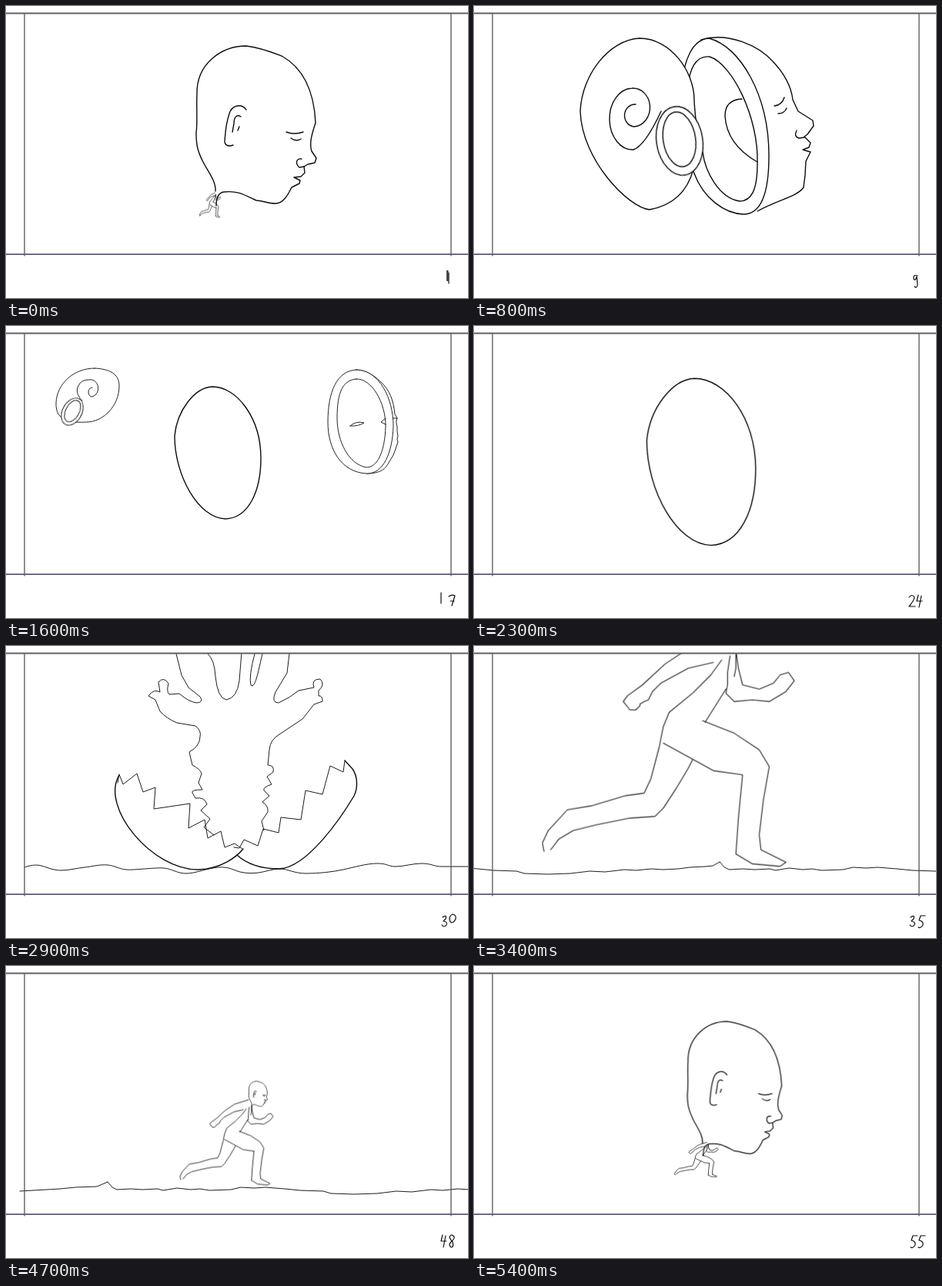
Recreate the animation shown at these times as an HTML page without scripts. Size 600 by 380 pixels, loop 5500 ms.

```html
<!DOCTYPE html>
<html lang="en">
<head>
<meta charset="utf-8">
<title>Line-drawn loop</title>
<style>
html, body { margin: 0; width: 100%; height: 100%; overflow: hidden; background: #fff; }
svg { display: block; }
.stage { width: 600px; height: 380px; fill: none; stroke: #0c0c0c; stroke-width: 1.2; stroke-linejoin: round; stroke-linecap: round; }
path, ellipse { vector-effect: non-scaling-stroke; }
.solid { fill: #fff; }
.thin { stroke-width: 1; stroke: #1c1c1c; }
.bold { stroke-width: 1.4; }

/* 55 drawings of 100 ms; steps() holds each one */
.stage * { animation-duration: 5.5s; animation-iteration-count: infinite; animation-timing-function: step-end; }

/* when each part is on stage */
.show-whole { animation-name: whole; }
@keyframes whole { 0% { opacity: 1 } 7.272% { opacity: 0 } 70.909%, 100% { opacity: 1 } }
.show-runner { animation-name: runnerOn; }
@keyframes runnerOn { 0% { opacity: 1 } 7.272% { opacity: 0 } 59.999%, 100% { opacity: 1 } }
.show-split { animation-name: split; }
@keyframes split { 0% { opacity: 0 } 7.272% { opacity: 1 } 41.818%, 100% { opacity: 0 } }
.show-marks { animation-name: marks; }
@keyframes marks { 0% { opacity: 1 } 16.363%, 100% { opacity: 0 } }
.show-slits { animation-name: slits; }
@keyframes slits { 0% { opacity: 0 } 25.454%, 100% { opacity: 1 } }
.show-egg { animation-name: eggOn; }
@keyframes eggOn { 0% { opacity: 0 } 16.363% { opacity: 1 } 45.454%, 100% { opacity: 0 } }
.show-hatch { animation-name: hatch; }
@keyframes hatch { 0% { opacity: 0 } 45.454% { opacity: 1 } 59.999%, 100% { opacity: 0 } }
.show-track { animation-name: trackOn; }
@keyframes trackOn { 0% { opacity: 0 } 59.999% { opacity: 1 } 92.727%, 100% { opacity: 0 } }
.show-past { animation-name: past; }
@keyframes past { 0% { opacity: 1 } 85.454%, 100% { opacity: 0 } }

/* whole head and running body */
.head { animation-name: head; }
@keyframes head {
  0% { transform: translate(0, 0) scale(1, 1); stroke-width: 1.4; animation-timing-function: steps(4) }
  7.272% { transform: translate(-25px, -14px) scale(1.08, 1.06); stroke-width: 1.4 }
  70.909% { transform: translate(204px, -99px) scale(.39, .39); stroke-width: 1; animation-timing-function: steps(3) }
  76.363% { transform: translate(261px, 90px) scale(.215, .215); stroke-width: .8; animation-timing-function: steps(5) }
  85.454% { transform: translate(277px, 141.6px) scale(.155, .16); stroke-width: .7; animation-timing-function: steps(7) }
  98.181% { transform: translate(82px, 28.4px) scale(.79, .84); stroke-width: 1.2 }
  100% { transform: translate(0, 0) scale(1, 1); stroke-width: 1.4 }
}
.runner { animation-name: runner; }
@keyframes runner {
  0% { transform: translate(242px, 242px) scale(.09, .115); stroke-width: .7; animation-timing-function: steps(4) }
  7.272% { transform: translate(262px, 248px) scale(.02, .03); stroke-width: .7 }
  59.999% { transform: translate(-30px, -29px) scale(1.1, 1.1); stroke-width: 1.1; animation-timing-function: steps(6) }
  70.909% { transform: translate(0, 0) scale(1, 1); stroke-width: 1.1; animation-timing-function: steps(3) }
  76.363% { transform: translate(138px, 129px) scale(.55, .55); stroke-width: 1; animation-timing-function: steps(5) }
  85.454% { transform: translate(184px, 170.2px) scale(.4, .4); stroke-width: .9; animation-timing-function: steps(7) }
  98.181% { transform: translate(240.8px, 228px) scale(.188, .162); stroke-width: .8 }
  100% { transform: translate(242px, 242px) scale(.09, .115); stroke-width: .7 }
}
.rear-arm { animation-name: rearArm; }
@keyframes rearArm {
  0%, 67.272%, 76.363%, 85.454%, 98.181%, 100% { animation-timing-function: steps(2); d: path("M327 10L282 24L252 44L225 69L207 82L202 89L210 99L217 99L222 94L222 92L227 89L232 87L237 77L247 67L280 49L310 42") }
  70.909%, 79.999%, 92.727% { animation-timing-function: steps(3); d: path("M290 10L262 20L245 40L231 67L220 73L218 80L222 88L230 88L232 82L228 76L234 72L241 76L242 66L248 58L268 42L285 33") }
}
.front-arm { animation-name: frontArm; }
@keyframes frontArm {
  0%, 67.272%, 76.363%, 85.454%, 98.181%, 100% { animation-timing-function: steps(2); d: path("M330 34L327 54L327 69L325 79L335 89L357 87L377 89L397 77L407 64L400 54L390 57L382 67L365 74L345 69L340 49L337 27M337 32L337 49L335 59M325 74L300 114") }
  70.909%, 79.999%, 92.727% { animation-timing-function: steps(3); d: path("M299 14L302 50L308 76L316 89L330 97L355 95L375 98L392 93L397 84L385 74L375 80L362 80L345 72L327 70L330 40L325 10M340 10L340 32L331 56M314 86L304 104") }
}
.rear-leg { animation-name: rearLeg; }
@keyframes rearLeg {
  0%, 67.272%, 76.363%, 85.454%, 98.181%, 100% { animation-timing-function: steps(2); d: path("M320 39L307 57L285 79L257 102L250 119L245 144L235 182L227 199L205 202L165 214L135 219L112 244L105 259L107 269M115 267L125 254L142 244L170 237L210 229L240 227L250 217L265 194L280 169L285 159") }
  70.909%, 79.999%, 92.727% { animation-timing-function: steps(3); d: path("M290 10L286 38L272 70L252 92L249 110L254 128L245 160L240 185L234 198L215 230L193 266L194 278L206 283L213 287M235 286L234 279L221 275L215 260L230 240L253 206L262 200L278 177L296 142L304 113") }
}
.front-leg { animation-name: frontLeg; }
@keyframes frontLeg {
  0%, 67.272%, 76.363%, 85.454%, 98.181%, 100% { animation-timing-function: steps(2); d: path("M297 112L335 127L365 147L377 167L370 207L365 249L367 267M367 267L397 282L390 287L357 284L337 272M337 272L340 229L345 177M345 177L310 172L250 139") }
  70.909%, 79.999%, 92.727% { animation-timing-function: steps(3); d: path("M308 95L330 112L355 140L364 160L352 176L325 178L278 177M236 188L217 192L216 186L228 183L242 164M290 158L303 155L313 150M322 152L304 148L297 142") }
}

/* the head comes apart */
.back { animation-name: back; }
@keyframes back {
  0%, 7.272% { transform: translate(92px, 0) scale(1); stroke-width: 1.4; animation-timing-function: steps(4) }
  14.545% { transform: translate(0, 0) scale(1); stroke-width: 1.4; animation-timing-function: steps(8) }
  29.09% { transform: translate(0, 0) scale(1); stroke-width: .9; animation-timing-function: steps(7) }
  41.818%, 100% { transform: translate(60px, 55px) scale(.2); stroke-width: .9 }
}
.face { animation-name: face; }
@keyframes face {
  0%, 7.272% { transform: translate(-35px, 0) scale(1); stroke-width: 1.4; animation-timing-function: steps(4) }
  14.545% { transform: translate(0, 0) scale(1); stroke-width: 1.4; animation-timing-function: steps(8) }
  29.09% { transform: translate(0, 0) scale(1); stroke-width: .9; animation-timing-function: steps(7) }
  41.818%, 100% { transform: translate(430px, 30px) scale(.2); stroke-width: .9 }
}
.shell { animation-name: shell; }
@keyframes shell {
  0%, 14.545% { animation-timing-function: steps(8); d: path("M215 42C255 42 286 85 286 122C286 150 310 250 228 265C200 262 140 200 138 137C140 90 175 44 215 42Z") }
  29.09%, 100% { d: path("M115 55C140 56 147 66 147 78C147 105 125 125 105 125C85 126 64 125 65 100C66 75 88 55 115 55Z") }
}
.spiral { animation-name: spiral; }
@keyframes spiral {
  0%, 14.545% { animation-timing-function: steps(8); d: path("M210 128A13 14 0 0 0 208 157A22 25 0 0 0 205 107A30 40 0 0 0 207 187Q222 182 243 137") }
  29.09%, 100% { d: path("M112 80A5 6 0 0 0 112 92A10 11 0 0 0 107 70A14 14 0 0 0 95 92Q96 96 99 97") }
}
.tube { animation-name: tube; }
@keyframes tube {
  0%, 14.545% { transform: translate(267px, 175.5px) rotate(-9deg) scale(1); animation-timing-function: steps(8) }
  29.09%, 100% { transform: translate(86px, 111.5px) rotate(28deg) scale(.42) }
}
.profile { animation-name: profile; }
@keyframes profile {
  0%, 14.545% { animation-timing-function: steps(8); d: path("M295 44C330 33 370 52 388 72C405 90 412 105 414 122L421 137L440 149L441 156L433 167L429 170L437 178L435 184L427 187L437 190L431 202L430 220L428 236C420 248 395 252 368 267") }
  29.09%, 100% { d: path("M455 57C470 57 482 68 488 74C498 84 503 95 505 115L507 118L508 120L507 123L507 127L508 131L508 137L509 143L508 147L509 151L506 160L503 168L497 178C493 185 488 192 468 192") }
}
.rim { animation-name: rim; }
@keyframes rim {
  0%, 14.545% { animation-timing-function: steps(8); d: path("M305 42C345 52 383 115 383 195C383 245 372 271 350 271C325 270 298 250 286 218C260 150 262 45 305 42Z") }
  29.09%, 100% { d: path("M455 57C485 57 503 95 503 130C502 165 490 193 468 192C435 190 418 160 418 125C418 85 430 58 455 57Z") }
}
.hollow { animation-name: hollow; }
@keyframes hollow {
  0%, 14.545% { animation-timing-function: steps(8); d: path("M306 66C335 75 370 145 368 205C368 240 360 254 345 254C318 250 300 215 297 190C270 140 270 62 306 66Z") }
  29.09%, 100% { d: path("M455 69C475 68 493 100 493 130C492 165 482 184 468 184C445 180 430 150 430 120C430 85 438 70 455 69Z") }
}

/* egg, hatching, ground */
.egg { animation-name: egg; }
@keyframes egg {
  0%, 16.363% { transform: translate(170px, 66px) scale(.6); animation-timing-function: steps(7) }
  29.09% { transform: translate(0, 0) scale(1); animation-timing-function: steps(8) }
  43.636%, 100% { transform: translate(-59.5px, -36px) scale(1.3) }
}
.left { animation-name: left; transform-origin: 290px 290px; }
@keyframes left {
  0%, 45.454% { transform: translate(0, 0) rotate(40deg); animation-timing-function: steps(4) }
  52.727% { transform: translate(0, 0) rotate(0); animation-timing-function: steps(4) }
  59.999%, 100% { transform: translate(-270px, 15px) rotate(-35deg) }
}
.right { animation-name: right; transform-origin: 312px 290px; }
@keyframes right {
  0%, 45.454% { transform: translate(0, 0) rotate(-40deg); animation-timing-function: steps(4) }
  52.727% { transform: translate(0, 0) rotate(0); animation-timing-function: steps(4) }
  59.999%, 100% { transform: translate(270px, 15px) rotate(35deg) }
}
.sprout { animation-name: sprout; transform-origin: 300px 260px; }
@keyframes sprout {
  0%, 45.454% { transform: translate(0, 0) scale(.4, .2); animation-timing-function: steps(4) }
  52.727% { transform: translate(0, 0) scale(1, 1); animation-timing-function: steps(4) }
  59.999%, 100% { transform: translate(0, -130px) scale(1.2, 1.3) }
}
.track { animation-name: track; }
@keyframes track {
  0%, 59.999% { transform: translateX(919.5px); animation-timing-function: steps(18) }
  92.727%, 100% { transform: translateX(-93px) }
}

/* handwritten counter */
.ones { animation-name: ones; animation-timing-function: steps(55); }
@keyframes ones { to { transform: translateY(-2200px) } }
.tens { animation-name: tens; }
@keyframes tens {
  0% { transform: translateY(0) }
  16.363% { transform: translateY(-40px) }
  34.545% { transform: translateY(-80px) }
  52.727% { transform: translateY(-120px) }
  70.909% { transform: translateY(-160px) }
  89.09%, 100% { transform: translateY(-200px) }
}
</style>
</head>
<body>
<svg class="stage" viewBox="0 0 600 380">
  <defs>
    <clipPath id="room"><path d="M0 9H600V340H0Z"/></clipPath>
    <path id="ground" d="M0 281L6 288L12 291L30 290L45 291L65 290L72 292L90 289L108 291L120 290L132 292L160 291L173 288L190 289L205 288L230 290L250 292L280 293L290 296L320 297L350 296L375 293L395 294L420 291L435 292L455 290L470 291L490 290L505 288L525 287L535 286L544 281"/>
    <path id="n0" d="M5 -1Q-1 2 2 9Q6 12 9 5Q10 0 5 -1"/>
    <path id="n1" d="M0 -3V11"/>
    <path id="n2" d="M0 3Q4 -2 7 3Q6 8 0 15H8"/>
    <path id="n3" d="M2 3Q8 -1 6 5L3 8Q9 9 7 13Q4 17 1 13"/>
    <path id="n4" d="M2 0L0 8H7M6 1L3 16"/>
    <path id="n5" d="M11 1H5L3 7Q9 8 8 13Q5 18 2 16"/>
    <path id="n6" d="M6 0Q-1 9 1 14Q5 18 7 11Q4 7 1 12"/>
    <path id="n7" d="M0 2Q4 -1 8 1L4 14M2 8H7"/>
    <path id="n8" d="M7 2Q2 -2 1 3Q2 6 5 9Q7 16 3 16Q-1 13 3 9Q8 5 7 2"/>
    <path id="n9" d="M1 1Q-5 -1 -4 5Q-2 9 0 2L1 13Q0 18 -3 15"/>
    <g id="digits">
      <use href="#n1"/><use href="#n2" y="40"/><use href="#n3" y="80"/><use href="#n4" y="120"/><use href="#n5" y="160"/>
      <use href="#n6" y="200"/><use href="#n7" y="240"/><use href="#n8" y="280"/><use href="#n9" y="320"/><use href="#n0" y="360"/>
    </g>
  </defs>

  <g clip-path="url(#room)">
    <g class="show-hatch">
      <path class="thin" d="M24 288S36 283 46 286S62 292 72 292S92 289 102 288S122 284 132 285S146 290 156 291S194 288 205 289S222 296 234 296S262 289 276 288S296 292 304 294S320 296 328 295S346 290 356 290S374 296 390 296S424 294 438 291S468 283 482 283S496 287 506 287S528 283 540 283S556 287 566 287H600"/>
      <g class="left">
        <path class="bold" d="M147 168C122 210 190 292 250 291C280 290 300 274 308 264"/>
        <path class="thin" d="M145 178L147 167L152 180L170 166L178 190L194 184L192 212L239 205L237 237L258 226L262 250L279 241L284 262L297 257L307 264"/>
      </g>
      <g class="right">
        <path class="bold" d="M300 272C312 283 330 290 355 290C392 288 436 222 452 195C457 185 457 170 450 160L440 149"/>
        <path class="thin" d="M440 149L438 164L421 156L411 193L389 188L383 226L357 223L354 243L334 238L327 260L309 252L303 263L296 262"/>
      </g>
      <g class="sprout thin">
        <path d="M221 10L228 38L237 54L252 66Q257 73 248 74Q238 73 225 62L212 63Q208 59 211 49Q205 39 198 47L200 60Q192 55 185 65L194 70L200 85Q208 94 222 100L246 104Q254 110 252 118Q252 130 238 138L242 155Q252 160 254 166L250 178L255 187Q240 187 242 191L246 198Q258 196 261 206L253 214L265 225L257 236L270 246"/>
        <path d="M262 10Q271 18 272 40Q275 68 286 70Q300 68 303 45L306 8M323 10Q315 40 318 51Q322 56 327 36L333 10"/>
        <path d="M368 10L365 35L350 60Q344 74 354 74Q368 68 380 58L400 54Q396 43 408 43Q415 50 406 58L406 65Q411 64 411 72L400 76L385 95L355 115Q343 122 342 135L340 155Q349 155 347 164L339 170L345 180Q333 184 335 188L342 195L333 203Q341 208 340 216L332 228L335 240"/>
      </g>
    </g>

    <g class="show-track">
      <g class="track thin">
        <use href="#ground"/>
        <use href="#ground" x="544"/>
        <path d="M-114 293L-62 290L-42 288L-14 287L0 281"/>
        <g class="show-past"><use href="#ground" x="-544"/><use href="#ground" x="-1088"/></g>
      </g>
    </g>

    <g class="show-runner">
      <g class="runner thin">
        <path class="rear-arm"/><path class="front-arm"/><path class="rear-leg"/><path class="front-leg"/>
      </g>
    </g>

    <g class="show-whole">
      <g class="head">
        <path d="M272 241C273 228 262 215 256 203C248 188 247 178 247 165C249 150 247 130 248 115C247 75 280 52 312 52C330 54 345 60 358 65C385 80 400 110 402 152C396 170 394 180 397 189L403 198L401 204L392 206L387 209L388 217L383 222L374 223L382 227L381 231L371 236C366 246 360 257 350 257C340 257 332 253 325 253C308 245 300 240 283 242C275 243 273 250 273 260"/>
        <path d="M384 199C377 198 375 205 381 210L387 209M312 135C306 127 294 128 290 140C285 155 285 165 284 176C284 182 290 183 295 181M305 144C299 140 296 146 296 153L294 164M303 157L301 162M364 164Q374 168 386 164M370 172Q377 177 383 173"/>
      </g>
    </g>
  </g>

  <g class="show-split">
    <g class="face">
      <path class="profile solid"/>
      <path class="rim solid"/>
      <path class="hollow"/>
      <path class="show-marks" d="M348 121Q326 122 326 143Q328 180 368 203M390 130Q400 129 403 119M395 140Q403 140 406 133M419 162Q415 170 422 172L429 171"/>
      <path class="show-slits" d="M447 130Q455 123 465 126Q457 131 447 130M493 120L487 125L493 128M503 120H508"/>
    </g>
  </g>

  <g class="show-egg">
    <path class="egg solid bold" d="M268 79C300 79 331 120 331 172C331 215 315 250 285 251C250 250 219 195 219 143C222 110 245 80 268 79Z"/>
  </g>

  <g class="show-split">
    <g class="back">
      <path class="shell solid"/>
      <path class="spiral"/>
      <g class="tube"><ellipse class="solid" rx="30" ry="45"/><ellipse cy="-2" rx="21" ry="36"/></g>
    </g>
  </g>

  <path d="M24 10V325M578 10V325" stroke="#454a45"/>
  <path d="M0 9.5H600" stroke="#5c6262" stroke-width="1.8"/>
  <path d="M0 323.2H600" stroke="#5e5673" stroke-width="1.8"/>

  <svg x="550" y="340" width="50" height="38">
    <g transform="translate(25 10)">
      <g class="ones">
        <path d="M-1.7 -5V7" stroke="#444" stroke-width="2.6"/>
        <use href="#digits"/><use href="#digits" y="400"/><use href="#digits" y="800"/>
        <use href="#digits" y="1200"/><use href="#digits" y="1600"/><use href="#digits" y="2000"/>
      </g>
    </g>
    <g transform="translate(15 10)">
      <g class="tens"><use href="#digits" y="40"/></g>
    </g>
  </svg>
</svg>
</body>
</html>
```
